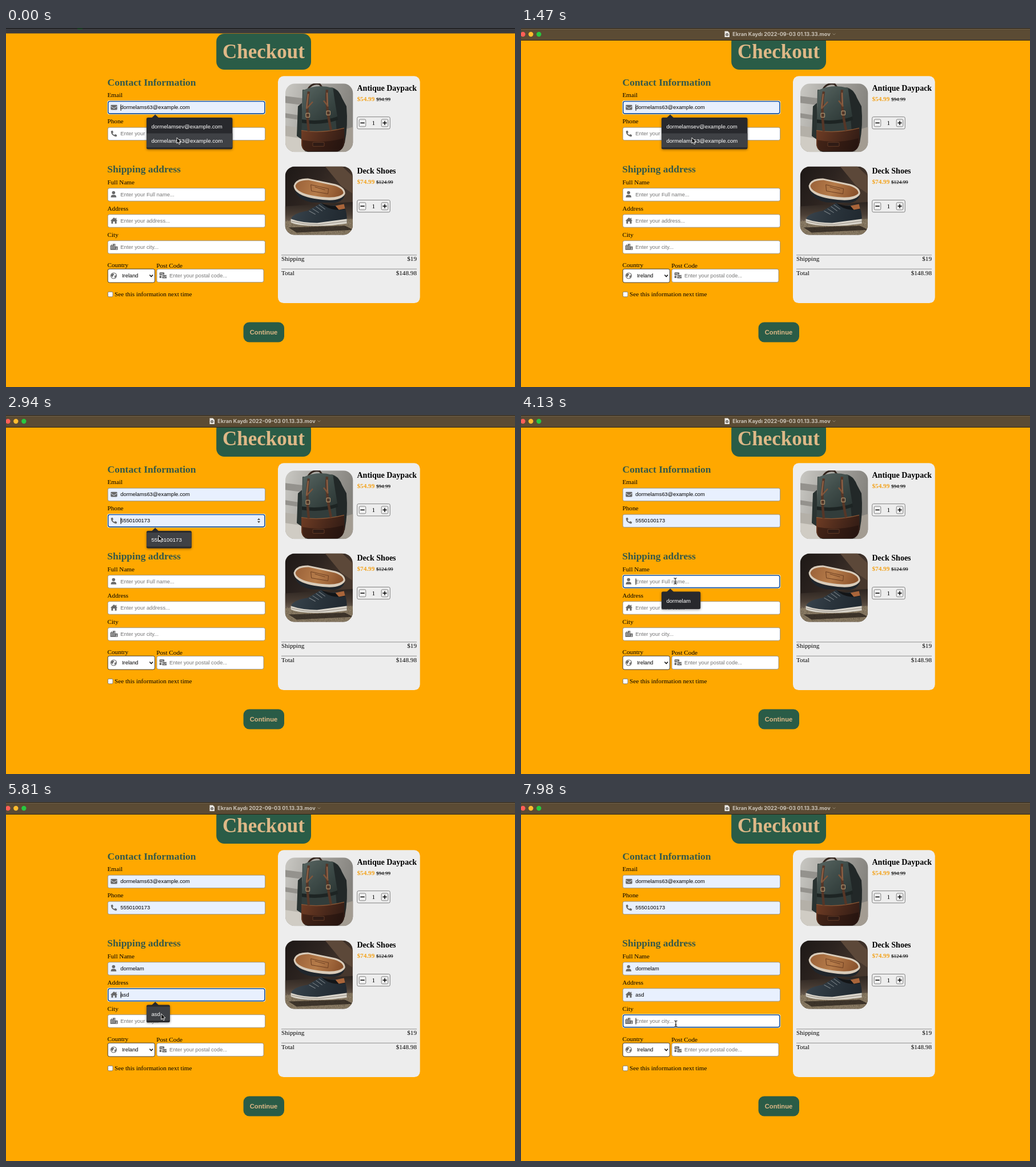
An HTML page with a canvas for the animation above (8000 ms loop, 891 px wide and 629 px high).

```html
<!DOCTYPE html>
<html lang="en">
<head>
<meta charset="utf-8">
<title>Checkout</title>
<style>
  html, body { margin: 0; width: 100%; height: 100%; overflow: hidden; background: #ffa800; }
  canvas { display: block; }
</style>
</head>
<body>
<canvas id="stage" width="891" height="629"></canvas>
<script>
const LOOP = 8000, STEP = 70;
const GREEN = '#2a5c47', SAND = '#deb887', ICON = '#696969';
const SERIF = '"Liberation Serif", "Times New Roman", serif';
const SANS = '"Liberation Sans", Arial, sans-serif';
const INPUT_FONT = `9.33px ${SANS}`, POPUP_FONT = `9.6px ${SANS}`;

const screen = document.getElementById('stage').getContext('2d');
const page = document.createElement('canvas');
page.width = 891;
page.height = 629;
let c = page.getContext('2d');

const fields = [
  { label: 'Email', y: 128, hint: 'Enter your email...', value: 'dormelams63@example.com',
    options: ['dormelamsev@example.com', 'dormelams63@example.com'], focusAt: 0, fillAt: 2170, icon: envelope },
  { label: 'Phone', y: 174, hint: 'Enter your phone...', value: '5550100173',
    options: ['5550100173'], focusAt: 2450, fillAt: 3080, icon: handset, spinner: true },
  { label: 'Full Name', y: 280.5, hint: 'Enter your Full name...', value: 'dormelam',
    options: ['dormelam'], focusAt: 3640, fillAt: 4620, icon: person },
  { label: 'Address', y: 326.5, hint: 'Enter your address...', value: 'asd',
    options: ['asd'], focusAt: 5250, fillAt: 5950, icon: house },
  { label: 'City', y: 372.5, hint: 'Enter your city...', value: '',
    options: [], focusAt: 6930, fillAt: Infinity, icon: city }
];

// time, x, y of the pointer
const pointerPath = [
  [0, 299, 192], [2170, 299, 192], [2420, 271, 184], [2520, 270, 185], [2800, 267, 211],
  [3080, 267, 211], [3570, 270, 291], [4130, 270, 291], [4410, 280, 325], [4690, 282, 330],
  [5110, 282, 330], [5250, 280, 338], [5390, 279, 338], [5740, 272, 370], [5950, 271, 373.5],
  [6580, 271, 373.5], [6860, 271, 388.5], [LOOP, 271, 388.5]
];

function box(x, y, w, h, r, fill, stroke, line = 1) {
  c.beginPath();
  c.roundRect(x, y, w, h, r);
  if (fill) { c.fillStyle = fill; c.fill(); }
  if (stroke) { c.strokeStyle = stroke; c.lineWidth = line; c.stroke(); }
}
function rect(x, y, w, h, fill) {
  c.fillStyle = fill;
  c.fillRect(x, y, w, h);
}
function disc(x, y, r, fill) {
  c.beginPath();
  c.arc(x, y, r, 0, 7);
  c.fillStyle = fill;
  c.fill();
}
function shape(d, fill) {
  c.fillStyle = fill;
  c.fill(new Path2D(d));
}
function stroke(d, color, width = 1) {
  c.strokeStyle = color;
  c.lineWidth = width;
  c.stroke(new Path2D(d));
}
function text(s, x, y, font, color = '#000', align = 'left') {
  c.font = font;
  c.fillStyle = color;
  c.textAlign = align;
  c.fillText(s, x, y);
}
function at(x, y, draw) {
  c.save();
  c.translate(x, y);
  draw();
  c.restore();
}
function gradient(x0, y0, x1, y1, ...colors) {
  const g = c.createLinearGradient(x0, y0, x1, y1);
  colors.forEach((color, i) => g.addColorStop(i / (colors.length - 1), color));
  return g;
}

// Icons, centred on the origin
function envelope() {
  box(-5.7, -4.2, 11.4, 8.6, 1.3, ICON);
  stroke('M-5.7 -2 L-1 1.3 Q0 2 1 1.3 L5.7 -2', '#e8f0fe', 0.9);
}
function handset() {
  shape('M-5 -4.6 L-2.4 -5.3 L-1 -2 L-2.6 -.7 Q-1.5 1.5 .7 2.6 L2 1 L5.3 2.4 L4.6 5 Q4 5.6 2.8 5.3 Q-4.6 3.6 -5.3 -3.2 Z', ICON);
}
function person() {
  disc(-.7, -3, 2.8, ICON);
  shape('M-5.5 5.2 Q-5.5 .8 -1.5 .8 L0 .8 Q4.2 .8 4.2 5.2 Z', ICON);
}
function house() {
  shape('M-6.2 .3 L0 -5.4 L2.7 -3 V-4.8 H4.3 V-1.5 L6.2 .3 H4.6 V5.2 H1.5 V1.5 H-1.5 V5.2 H-4.6 V.3 Z', ICON);
}
function city() {
  shape('M-6.4 -2.4 H-4.8 V-4.6 H-3.8 V-2.4 H-2.3 V-5.3 H2.4 V-.7 H6.6 V5.3 H-6.4 Z', ICON);
  for (const [x, y] of [[-5, -.8], [-5, 1.6], [-2.5, -.8], [-2.5, 1.6], [0, -3.6], [0, -1], [0, 1.6], [3.7, 1.2], [3.7, 3.2]])
    rect(x, y, 1.2, 1.3, '#fff');
}
function globe() {
  c.beginPath();
  c.arc(0, 0, 5, 0, 7);
  c.strokeStyle = ICON;
  c.lineWidth = 1.1;
  c.stroke();
  shape('M-4.3 -2 L-1.5 -4 L1 -2.5 L-1 0 L-2 2.5 L-4.4 .6 Z M1.5 .2 L4.3 -1.2 L4 2 L1.5 4 Z', ICON);
}
function mailPile() {
  box(-6.3, -5.3, 8.4, 5, 1, ICON);
  box(-2, -1, 8.5, 6.3, 1, ICON, '#fff', .8);
  stroke('M-2 .8 L2.2 3 L6.5 .8 M-5 -2.9 H0', '#fff', .8);
  rect(-6.3, .6, 3.4, 3.8, ICON);
}

function clipPhoto(x, y, draw) {
  at(x, y, () => {
    c.beginPath();
    c.roundRect(0, 0, 118.3, 120, 17);
    c.clip();
    draw();
  });
}

function bagPhoto() {
  rect(0, 0, 119, 120, gradient(0, 0, 119, 30, '#c9c8c3', '#a5a39e', '#85837e'));
  shape('M0 22 L32 26 V38 L0 34 Z M0 52 L26 56 V64 L0 60 Z', '#94928d');
  shape('M0 74 L30 78 V120 H0 Z', '#b4b0a8');
  shape('M0 92 L34 97 V120 H0 Z', '#d0ccc4');
  shape('M98 82 L119 76 V120 H96 Z', '#a39c92');
  stroke('M40 9 Q48 -2 60 1 L66 9', '#33251e', 3);

  // side pocket, body, far side
  shape('M29 34 L22 40 L20 92 L30 99 Z', '#2a3331');
  shape('M30 11 L82 7 Q93 10 97 22 L103 34 L104 100 Q103 115 92 119 L40 120 Q28 118 28 104 Z', '#323d3b');
  shape('M84 9 Q95 13 99 25 L107 40 Q110 74 104 104 L92 112 Z', '#222828');

  // flap
  shape('M31 12 Q56 0 83 8 L91 58 Q62 68 29 63 Z', gradient(30, 8, 80, 66, '#56635f', '#3f4c49', '#2d3836'));
  shape('M29 63 Q62 68 91 58 L92 64 Q62 74 29 69 Z', '#1d2423');

  // leather base
  shape('M28 82 Q62 88 103 78 L104 102 Q102 116 92 119 H40 Q28 118 28 104 Z', gradient(28, 85, 104, 120, '#6e3c24', '#4b291b', '#2b1813'));
  stroke('M28 82 Q62 88 103 78', '#8a5634', 1.3);
  shape('M30 99 Q64 106 102 96 L100 112 Q96 119 88 120 H40 Q30 117 30 108 Z', 'rgba(25,13,10,.45)');
  box(48, 103, 20, 7, 1, '#2f1b15', '#77492f', .7);

  // straps and buckles
  stroke('M41 14 Q36 40 41 84 M73 11 Q70 36 80 82', '#553627', 4.4);
  stroke('M40 18 L37 44 M73 16 L74 40', '#8d6045', 2.4);
  stroke('M37 44 L48 32 M75 40 L67 30', '#80553a', 2.4);
  box(36, 52, 6.5, 7, 1, null, '#b08f6b', 1.2);
  box(72, 48, 6.5, 7, 1, null, '#b08f6b', 1.2);
}

function shoePhoto() {
  rect(0, 0, 119, 120, gradient(0, 0, 100, 60, '#1d1816', '#2d2420', '#46372d'));
  shape('M70 0 H100 L119 18 V48 L98 34 Z', '#5c4839');
  shape('M0 70 L119 62 V120 H0 Z', gradient(0, 64, 0, 104, '#2f2722', '#4a3e35', '#7d6f5f'));
  shape('M0 96 L119 92 V120 H0 Z', '#83755f');
  let seed = 11;
  const random = () => (seed = seed * 16807 % 2147483647) / 2147483647;
  for (let i = 0; i < 500; i++)
    rect(random() * 119, 92 + random() * 28, 1, 1, i % 2 ? 'rgba(190,170,145,.4)' : 'rgba(50,40,34,.4)');

  // upturned shoe
  shape('M17 42 Q22 58 46 63 L86 64 Q100 62 104 52 L60 50 Z', '#20262c');
  shape('M15 34 Q18 21 40 21 L88 31 Q106 37 105 48 Q99 60 74 59 Q40 57 25 48 Q15 42 15 34 Z', '#d9ccba');
  shape('M18 34 Q21 24 41 24 L87 34 Q102 39 102 47 Q96 55 72 54 Q42 52 28 45 Q18 40 18 34 Z', gradient(18, 24, 95, 56, '#9a6138', '#b67c4a', '#8a522c'));
  stroke('M45 32 L76 39 L75 48 L46 43 Z M52 36 L70 41', '#6d3f22', 1);

  // standing shoe
  shape('M6 107 L105 104 L119 111 L20 116 Z', 'rgba(30,23,19,.7)');
  shape('M11 90 Q18 81 39 78 L63 64 L76 69 L103 67 Q109 82 108 97 L50 102 L12 97 Z', gradient(10, 65, 105, 100, '#3a454e', '#2a343c', '#20282f'));
  shape('M63 64 Q82 73 103 67 L105 75 Q84 79 69 69 Z', '#131517');
  shape('M88 69 L103 66 L105 74 L94 76 Z', '#a9653a');
  stroke('M42 78 L53 84 M48 74 L59 81 M54 70 L65 78 M59 67 L70 75', '#7b8286', 1.1);
  shape('M10 92 Q30 99 56 99 L108 92 V100 Q76 105 46 104 Q18 103 10 98 Z', '#d9d4ca');
  stroke('M11 96 Q34 102 58 102 L108 96', '#82796f', .8);
}

function product(y, name, price, old) {
  text(name, 614.5, y, `bold 14px ${SERIF}`);
  text(price, 614.5, y + 18, `bold 11.2px ${SERIF}`, '#f3a21a');
  const oldFont = `9.1px ${SERIF}`;
  text(old, 648, y + 18, oldFont);
  rect(648, y + 14.6, c.measureText(old).width, .7, '#000');
  box(614.7, y + 46.2, 57.6, 21.2, 2.5, null, '#777', .9);
  for (const x of [618.2, 657.2]) {
    box(x, y + 50.5, 11.6, 12.8, 2, '#efefef', '#757575', .9);
    rect(x + 2.2, y + 56.1, 7.2, 1.5, '#000');
  }
  rect(662.3, y + 53.3, 1.4, 7.2, '#000');
  text('1', 643.3, y + 60.6, `11.2px ${SERIF}`, '#000', 'center');
}

function drawPage() {
  rect(0, 0, 891, 629, '#ffa800');
  rect(0, 0, 891, 9.5, '#3a3a3d');
  rect(0, 0, 891, 1, '#101012');
  rect(125, 1, 9, 1, '#1f6a2c');

  box(368.2, 10, 165.8, 63, 14, GREEN);
  text('Checkout', 451, 53, `bold 35px ${SERIF}`, SAND, 'center');
  text('Contact Information', 177.5, 100.5, `bold 17.5px ${SERIF}`, '#34594a');
  text('Shipping address', 177.3, 253.2, `bold 17.5px ${SERIF}`, '#34594a');

  const label = `11.2px ${SERIF}`;
  for (const f of fields) text(f.label, 177.5, f.y - 6.8, label);
  text('Country', 177.5, 419, label);
  text('Post Code', 263.3, 419.6, label);

  box(178.2, 422.2, 82.3, 23.8, 3, '#fff', '#333', .9);
  at(188.5, 434, globe);
  text('Ireland', 203, 437.3, INPUT_FONT);
  stroke('M251.4 432.6 L254.3 435.6 L257.2 432.6', '#111', 1.5);
  box(264, 422.4, 187, 23, 3, '#fff', '#858585', .8);
  at(275, 433.6, mailPile);
  text('Enter your postal code...', 286, 437.3, INPUT_FONT, '#757575');
  box(178.4, 462.3, 8.6, 8.6, 1.8, '#fff', '#767676', .9);
  text('See this information next time', 190, 470, label);

  box(476, 84.3, 248.7, 397.8, 10, '#ededed');
  clipPhoto(489, 97.3, bagPhoto);
  clipPhoto(488.6, 242.6, shoePhoto);
  product(109.5, 'Antique Daypack', '$54.99', '$94.99');
  product(255.3, 'Deck Shoes', '$74.99', '$124.99');
  for (const [y, name, sum] of [[397.4, 'Shipping', '$19'], [421.8, 'Total', '$148.98']]) {
    rect(482, y, 237, .9, '#858585');
    text(name, 482, y + 11, label);
    text(sum, 719, y + 11, label, '#000', 'right');
  }

  box(415.6, 515.6, 71.4, 34.8, 10, GREEN);
  text('Continue', 451, 536.7, `bold 11.2px ${SANS}`, SAND, 'center');
}

function drawTitleBar(alpha) {
  if (!alpha) return;
  c.globalAlpha = alpha;
  rect(0, 0, 891, 22, '#5b4b34');
  rect(0, 0, 891, 1, '#17130d');
  rect(0, 1, 891, 1, '#73644e');
  rect(0, 21, 891, 1, '#2c2416');
  disc(3.4, 11, 4.2, '#ff5f57');
  disc(17.3, 11, 4.2, '#febc2e');
  disc(31.3, 11, 4.2, '#28c840');
  shape('M356.5 5.5 H362 L365 8.5 V16 H356.5 Z', '#e9e7e3');
  disc(360.7, 11.7, 2.4, '#55504a');
  disc(360.7, 11.7, 1, '#e9e7e3');
  text('Ekran Kaydı 2022-09-03 01.13.33.mov', 456, 14.3, '700 9.1px Inter, sans-serif', '#cac3b8', 'center');
  stroke('M545.6 9.6 L548 12 L550.4 9.6', '#93866f', 1);
  c.globalAlpha = 1;
}

function pointerAt(t) {
  const i = Math.max(1, pointerPath.findIndex(p => p[0] > t));
  const [t0, x0, y0] = pointerPath[i - 1], [t1, x1, y1] = pointerPath[i];
  const k = (t - t0) / (t1 - t0), e = k * k * (3 - 2 * k);
  return { x: x0 + (x1 - x0) * e, y: y0 + (y1 - y0) * e };
}

const inside = (p, b) => p.x >= b.x && p.x <= b.x + b.w && p.y >= b.y && p.y <= b.y + b.h;

function popupBox(f) {
  c.font = POPUP_FONT;
  const widest = Math.max(...f.options.map(o => c.measureText(o).width));
  return { x: 246, y: f.y + 29, w: widest + 25.5, h: 6 + 24.6 * f.options.length };
}

function drawField(f, t, focused, preview) {
  const filled = t >= f.fillAt, shown = filled || preview;
  const fill = shown ? '#e8f0fe' : '#fff';
  if (focused) {
    box(177.2, f.y - 1, 277.2, 24.6, 4, '#fff');
    box(178.7, f.y + .5, 274.2, 21.6, 3, fill, '#15509b', 1.6);
  } else {
    box(178.2, f.y + .2, 275.4, 22.5, 3, fill, '#8a8a8a', .8);
  }
  at(189, f.y + 11, f.icon);
  text(shown ? f.value : f.hint, 200.3, f.y + 14.4, INPUT_FONT, shown ? '#000' : '#757575');
  if (!focused) return;
  const since = t - (filled ? f.fillAt : f.focusAt);
  if (preview || since % 1000 < 500) {
    const x = filled ? 200.6 + c.measureText(f.value).width : 200.6;
    rect(x, f.y + 6, 1, 11, '#000');
  }
  if (f.spinner) shape(`M440 ${f.y + 10} h5 l-2.5 -3.2 Z M440 ${f.y + 12} h5 l-2.5 3.2 Z`, '#505050');
}

function drawPopup(f, b, pointer) {
  c.save();
  c.shadowColor = 'rgba(0,0,0,.45)';
  c.shadowBlur = 4;
  c.shadowOffsetY = 1;
  box(b.x, b.y, b.w, b.h, 2.5, '#28292d');
  c.restore();
  shape(`M${b.x + 9} ${b.y + .5} l6.2 -6 l6.2 6 Z`, '#28292d');
  f.options.forEach((option, i) => {
    const row = { x: b.x, y: b.y + 3 + 24.6 * i, w: b.w, h: 24.6 };
    if (inside(pointer, row)) rect(row.x, row.y, row.w, row.h, '#3f4145');
    text(option, b.x + 8.4, row.y + 16, POPUP_FONT, '#fff');
  });
}

function drawPointer(p, beam) {
  at(p.x, p.y, () => {
    if (beam) {
      const d = 'M-2.6 -5.2 Q0 -5.2 0 -3.6 Q0 -5.2 2.6 -5.2 M0 -4 V4 M-2.6 5.2 Q0 5.2 0 3.6 Q0 5.2 2.6 5.2 M-1.5 1.8 H1.5';
      stroke(d, 'rgba(255,255,255,.7)', 2.2);
      stroke(d, '#111', 1.1);
    } else {
      const d = 'M0 0 V10.2 L2.3 8.1 L4 11.8 L5.7 11 L4.1 7.4 H7.2 Z';
      shape(d, '#000');
      stroke(d, '#fff', .9);
    }
  });
}

function barAlpha(t) {
  if (t < 770) return 0;
  if (t < 840) return .3;
  if (t < 910) return .65;
  return t < 1470 ? .95 : 1;
}

function render(t) {
  c.drawImage(page, 0, 0);
  const pointer = pointerAt(t);
  const active = fields.filter(f => f.focusAt <= t).pop();
  const popup = active.options.length && t < active.fillAt ? popupBox(active) : null;
  const overPopup = popup !== null && inside(pointer, popup);
  for (const f of fields) drawField(f, t, f === active, f === active && overPopup);
  if (popup) drawPopup(active, popup, pointer);
  drawTitleBar(barAlpha(t));
  const overField = fields.some(f => inside(pointer, { x: 178, y: f.y, w: 276, h: 23 }));
  drawPointer(pointer, overField && !overPopup);
}

drawPage();
c = screen;

function tick() {
  const t = performance.now() % LOOP;
  render(Math.floor(t / STEP) * STEP);
  requestAnimationFrame(tick);
}
tick();
</script>
</body>
</html>
```
